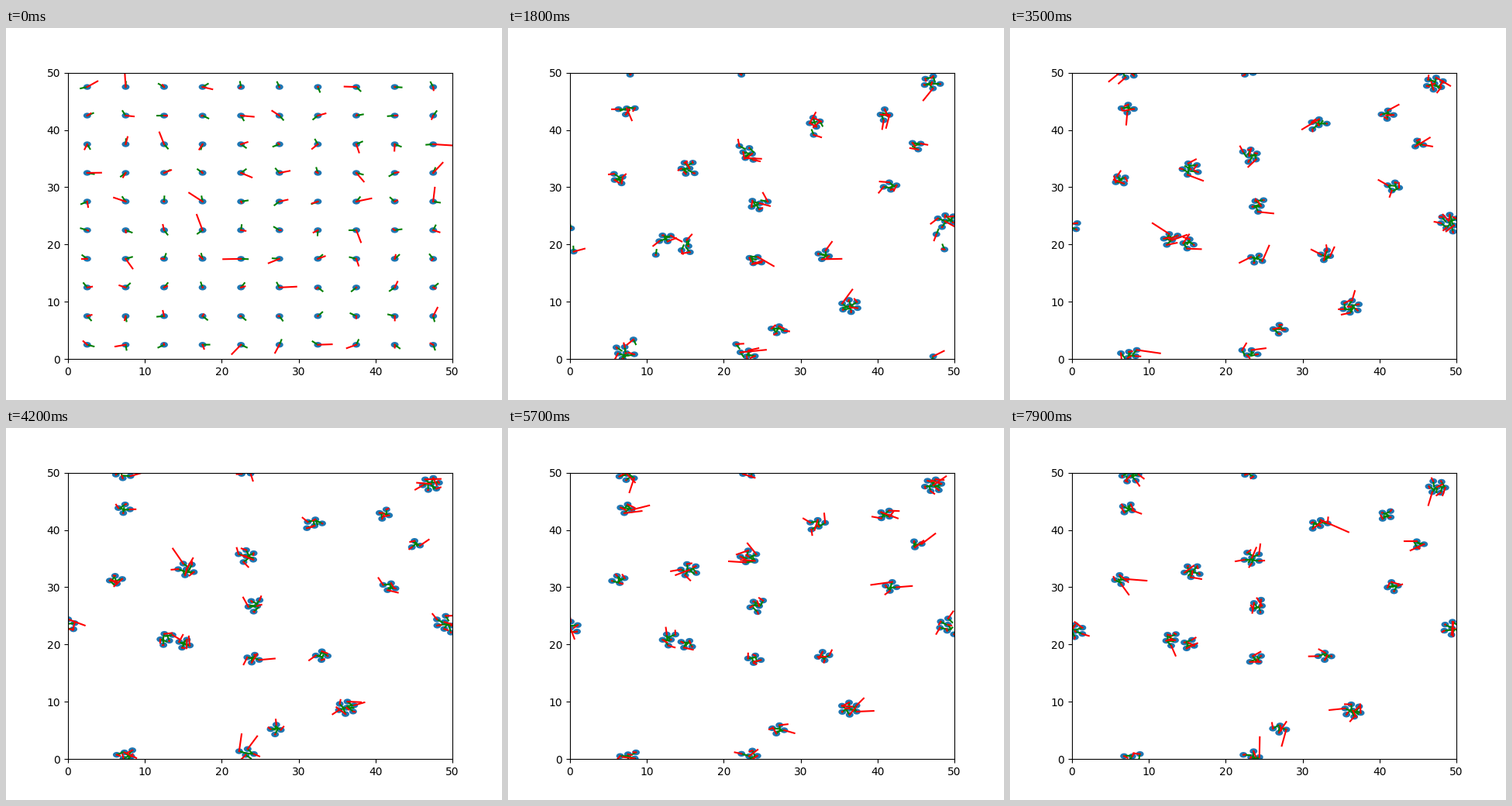
These frames come from a looping animation (640x480 px, 8000 ms). A matplotlib script:

```python
import numpy as np
import matplotlib.pyplot as plt
from matplotlib.animation import FuncAnimation
from matplotlib.collections import EllipseCollection, LineCollection

SIZE, FRAMES, STEP_MS = 50, 80, 100
SPEED, GAP = 0.4, 1.08
DRIFT = np.array([0.12, -0.25])

# places where groups gather
HOMES = np.array([
    (23.3, 50.5), (27, 5.2), (7.5, 0), (15.5, 33), (12.8, 21), (15.2, 20.1),
    (32, 41), (41, 42.7), (47.3, 47.8), (45.1, 37.5), (41.8, 30.1),
    (24.2, 26.8), (24, 17.5), (33, 18), (36.4, 8.8), (6.3, 31.3),
    (7.3, 43.7), (23.3, 35.3), (49.6, 23.2),
])


def wrap(d):
    """Shortest displacement in the periodic box."""
    return (d + SIZE / 2) % SIZE - SIZE / 2


def polar(angle, length):
    return np.stack([length * np.cos(angle), length * np.sin(angle)], -1)


def separate(pos, rounds=12):
    """Push overlapping discs apart."""
    for _ in range(rounds):
        d = wrap(pos[:, None] - pos[None])
        r = np.hypot(d[..., 0], d[..., 1])
        np.fill_diagonal(r, GAP)
        push = np.clip(GAP - r, 0, None) / np.maximum(r, 1e-6)
        pos = pos + 0.3 * (push[..., None] * d).sum(1)
    return pos


def simulate():
    rng = np.random.default_rng(12)
    grid = np.arange(2.5, SIZE, 5)
    pos = np.stack(np.meshgrid(grid, grid), -1).reshape(-1, 2)
    n = len(pos)
    # each disc joins the nearest group; larger groups drift further
    gaps = wrap(pos[:, None] - HOMES[None])
    group = (gaps ** 2).sum(-1).argmin(1)
    members = np.bincount(group, minlength=len(HOMES))
    drift = np.clip(members - 4, 0, 7)[:, None] * DRIFT
    states = []
    for i in range(FRAMES):
        target = HOMES + drift * (i - 52) / 54
        to = wrap(target[group] - pos)
        dist = np.hypot(*to.T)
        angle = np.arctan2(to[:, 1], to[:, 0]) + rng.normal(0, 0.4, n)
        noise = polar(rng.uniform(0, 2 * np.pi, n), rng.normal(0, 1.2, n))
        states.append((pos % SIZE, polar(angle, 0.9), noise))
        pull = polar(angle, np.minimum(SPEED, 0.2 * dist))
        pos = separate(pos + pull + 0.05 * noise)
    return states


states = simulate()

fig, ax = plt.subplots(figsize=(6.4, 4.8), dpi=100)
ax.set_xlim(0, SIZE)
ax.set_ylim(0, SIZE)
ones = np.ones(len(states[0][0]))
discs = EllipseCollection(ones, ones, 0 * ones, units="xy", facecolors="C0",
                          linewidths=0, offsets=states[0][0],
                          offset_transform=ax.transData, zorder=1)
ax.add_collection(discs)


def sticks(color):
    lines = LineCollection([], colors=color, linewidths=1.5,
                           capstyle="projecting", zorder=2)
    ax.add_collection(lines, autolim=False)
    return lines


green, red = sticks("green"), sticks("red")


def update(i):
    pos, heading, noise = states[i]
    discs.set_offsets(pos)
    green.set_segments(np.stack([pos, pos + heading], 1))
    red.set_segments(np.stack([pos, pos + noise], 1))
    return discs, green, red


anim = FuncAnimation(fig, update, frames=FRAMES, interval=STEP_MS,
                     repeat=True, repeat_delay=0)
plt.show()
```
